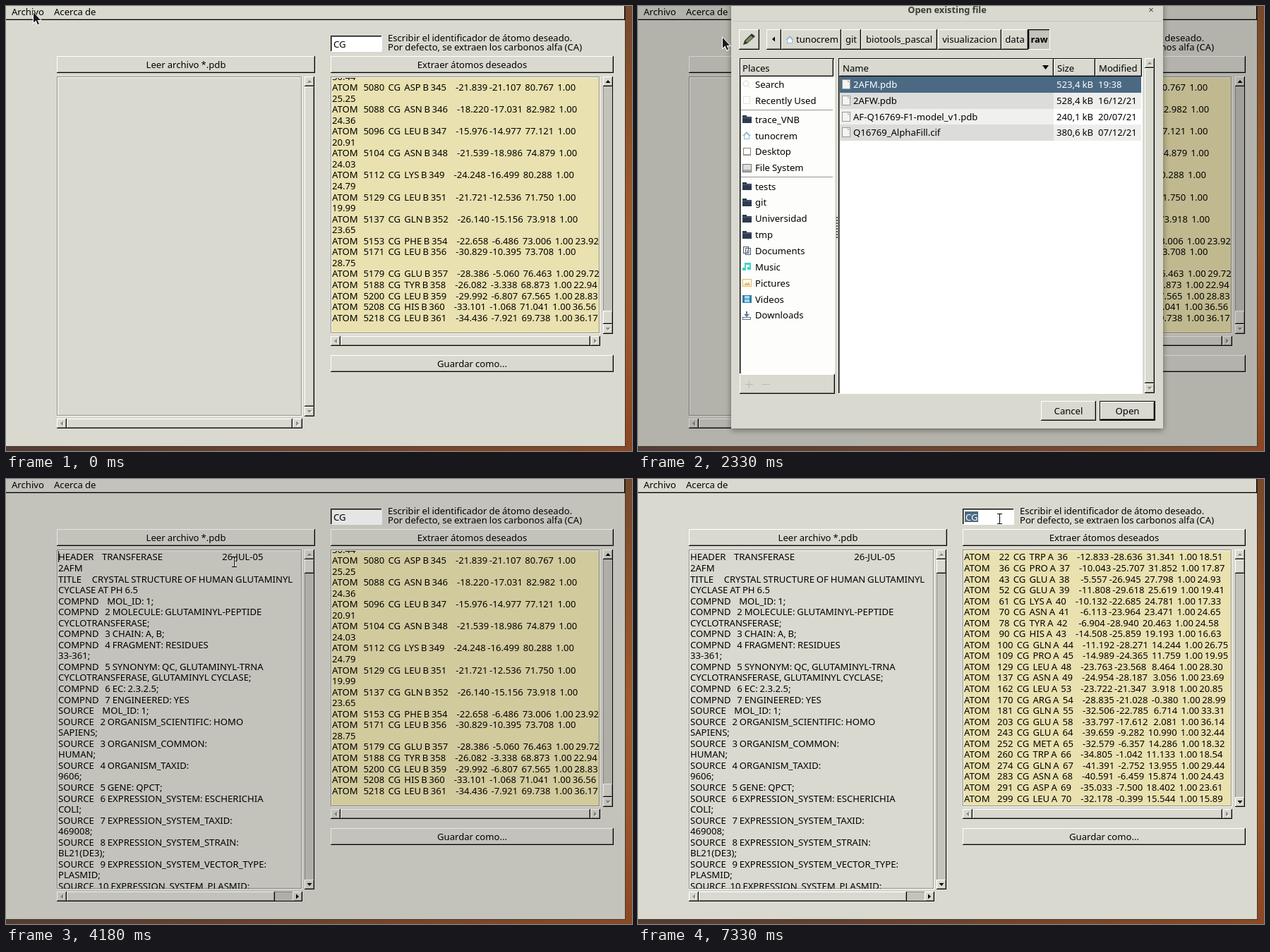
An HTML page with a canvas that plays this animation: 887x631 px, repeating every 8000 ms.

```html
<!DOCTYPE html>
<html lang="es">
<head>
<meta charset="utf-8">
<style>
html, body { margin: 0; width: 100%; height: 100%; overflow: hidden; }
canvas { display: block; }
</style>
</head>
<body>
<canvas id="stage" width="887" height="631"></canvas>
<script>
const LOOP = 8000, W = 887, H = 631, PAD = 40;
const BG = '#d9d9d0', TROUGH = '#c3c3ba', BLUE = '#4b6983', LIGHT = '#ebebe5';
const GRAY = '#8f8f87', FACE = '"Noto Sans", "Open Sans", sans-serif';

const screen = document.getElementById('stage').getContext('2d');
const layer = document.createElement('canvas');
layer.width = W;
layer.height = H + PAD;
const sheet = layer.getContext('2d');
let g = screen;

const header = `HEADER    TRANSFERASE                             26-JUL-05
2AFM
TITLE     CRYSTAL STRUCTURE OF HUMAN GLUTAMINYL
CYCLASE AT PH 6.5
COMPND    MOL_ID: 1;
COMPND   2 MOLECULE: GLUTAMINYL-PEPTIDE
CYCLOTRANSFERASE;
COMPND   3 CHAIN: A, B;
COMPND   4 FRAGMENT: RESIDUES
33-361;
COMPND   5 SYNONYM: QC, GLUTAMINYL-TRNA
CYCLOTRANSFERASE, GLUTAMINYL CYCLASE;
COMPND   6 EC: 2.3.2.5;
COMPND   7 ENGINEERED: YES
SOURCE    MOL_ID: 1;
SOURCE   2 ORGANISM_SCIENTIFIC: HOMO
SAPIENS;
SOURCE   3 ORGANISM_COMMON:
HUMAN;
SOURCE   4 ORGANISM_TAXID:
9606;
SOURCE   5 GENE: QPCT;
SOURCE   6 EXPRESSION_SYSTEM: ESCHERICHIA
COLI;
SOURCE   7 EXPRESSION_SYSTEM_TAXID:
469008;
SOURCE   8 EXPRESSION_SYSTEM_STRAIN:
BL21(DE3);
SOURCE   9 EXPRESSION_SYSTEM_VECTOR_TYPE:
PLASMID;
SOURCE  10 EXPRESSION_SYSTEM_PLASMID:`.split('\n');

// Formats atoms as PDB lines; long ones wrap before the last value.
const atoms = text => text.trim().split('\n').flatMap(line => {
  const [id, res, chain, seq, x, y, z, b] = line.split(' ');
  const start = 'ATOM  ' + id.padStart(5) + '  CG  ' + res + ' ' + chain + seq.padStart(4) +
    '    ' + x.padStart(8) + y.padStart(8) + z.padStart(8) + '  1.00';
  return id > 999 && y.length > 6 ? [start, b] : [start + b.padStart(6)];
});

const tail = ['30.44', ...atoms(`
5080 ASP B 345 -21.839 -21.107 80.767 25.25
5088 ASN B 346 -18.220 -17.031 82.982 24.36
5096 LEU B 347 -15.976 -14.977 77.121 20.91
5104 ASN B 348 -21.539 -18.986 74.879 24.03
5112 LYS B 349 -24.248 -16.499 80.288 24.79
5129 LEU B 351 -21.721 -12.536 71.750 19.99
5137 GLN B 352 -26.140 -15.156 73.918 23.65
5153 PHE B 354 -22.658 -6.486 73.006 23.92
5171 LEU B 356 -30.829 -10.395 73.708 28.75
5179 GLU B 357 -28.386 -5.060 76.463 29.72
5188 TYR B 358 -26.082 -3.338 68.873 22.94
5200 LEU B 359 -29.992 -6.807 67.565 28.83
5208 HIS B 360 -33.101 -1.068 71.041 36.56
5218 LEU B 361 -34.436 -7.921 69.738 36.17`)];

const head = atoms(`
22 TRP A 36 -12.833 -28.636 31.341 18.51
36 PRO A 37 -10.043 -25.707 31.852 17.87
43 GLU A 38 -5.557 -26.945 27.798 24.93
52 GLU A 39 -11.808 -29.618 25.619 19.41
61 LYS A 40 -10.132 -22.685 24.781 17.33
70 ASN A 41 -6.113 -23.964 23.471 24.65
78 TYR A 42 -6.904 -28.940 20.463 24.58
90 HIS A 43 -14.508 -25.859 19.193 16.63
100 GLN A 44 -11.192 -28.271 14.244 26.75
109 PRO A 45 -14.989 -24.365 11.759 19.95
129 LEU A 48 -23.763 -23.568 8.464 28.30
137 ASN A 49 -24.954 -28.187 3.056 23.69
162 LEU A 53 -23.722 -21.347 3.918 20.85
170 ARG A 54 -28.835 -21.028 -0.380 28.99
181 GLN A 55 -32.506 -22.785 6.714 33.31
203 GLU A 58 -33.797 -17.612 2.081 36.14
243 GLU A 64 -39.659 -9.282 10.990 32.44
252 MET A 65 -32.579 -6.357 14.286 18.32
260 TRP A 66 -34.805 -1.042 11.133 18.54
274 GLN A 67 -41.391 -2.752 13.955 29.44
283 ASN A 68 -40.591 -6.459 15.874 24.43
291 ASP A 69 -35.033 -7.500 18.402 23.61
299 LEU A 70 -32.178 -0.399 15.544 15.89`);

function rect(x, y, w, h, color) {
  g.fillStyle = color;
  g.fillRect(x, y, w, h);
}

function poly(color, ...p) {
  g.beginPath();
  for (let i = 0; i < p.length; i += 2) g.lineTo(p[i], p[i + 1]);
  g.closePath();
  g.fillStyle = color;
  g.fill();
}

// y is the middle of the capitals
function text(s, x, y, { color = '#000', align = 'left', bold = false, space = -0.3 } = {}) {
  g.font = (bold ? 'bold 12.8px ' : '13.1px ') + FACE;
  g.wordSpacing = space + 'px';
  g.textAlign = align;
  g.fillStyle = color;
  g.fillText(s, x, Math.round(y + 4.6));
}

function bevel(x, y, w, h, fill = BG, down = false) {
  rect(x, y, w, h, down ? '#fff' : '#000');
  rect(x, y, w - 1, h - 1, down ? '#000' : '#fff');
  rect(x + 1, y + 1, w - 2, h - 2, down ? fill : GRAY);
  if (down) {
    rect(x + 1, y + 1, w - 2, 1, GRAY);
    rect(x + 1, y + 1, 1, h - 2, GRAY);
  }
  rect(x + (down ? 2 : 1), y + (down ? 2 : 1), w - 3, h - 3, fill);
}

function button(label, x, y, w, h, fill, down) {
  bevel(x, y, w, h, fill, down);
  text(label, x + w / 2, y + h / 2, { align: 'center' });
}

function arrow(cx, cy, dx, dy, on) {
  const tri = (o, c) => poly(c, cx + dx * 2 + o, cy + dy * 2 + o,
    cx - dx * 2 - dy * 3.5 + o, cy - dy * 2 - dx * 3.5 + o,
    cx - dx * 2 + dy * 3.5 + o, cy - dy * 2 + dx * 3.5 + o);
  if (!on) tri(1, '#fff');
  tri(0, on ? '#000' : GRAY);
}

// a..b is the thumb's extent along the bar
function scrollbar(x, y, w, h, a, b, less, more) {
  const tall = h > w;
  rect(x, y, w, h, '#000');
  rect(x, y, w - 1, h - 1, GRAY);
  rect(x + 1, y + 1, w - 2, h - 2, TROUGH);
  if (tall) {
    bevel(x, y, w, 14);
    bevel(x, y + h - 14, w, 14);
    bevel(x, a, w, b - a);
    arrow(x + w / 2, y + 7, 0, -1, less);
    arrow(x + w / 2, y + h - 7, 0, 1, more);
  } else {
    bevel(x, y, 14, h);
    bevel(x + w - 14, y, 14, h);
    bevel(a, y, b - a, h);
    arrow(x + 7, y + h / 2, -1, 0, less);
    arrow(x + w - 7, y + h / 2, 1, 0, more);
  }
}

function memo(x, y, w, h, fill, lines, first, space) {
  rect(x, y, w, h, '#fff');
  rect(x, y, w - 1, h - 1, GRAY);
  rect(x + 1, y + 1, w - 3, h - 3, '#fff');
  rect(x + 2, y + 2, w - 4, h - 4, fill);
  g.save();
  g.beginPath();
  g.rect(x + 1, y + 2, w - 2, h - 3);
  g.clip();
  lines.forEach((s, i) => text(s, x + 2, first + i * 15.55, { space }));
  g.restore();
}

function wallpaper() {
  const side = g.createLinearGradient(0, 0, 0, H);
  ['#74492b', '#8d5129', '#a05a2b', '#9c552a', '#8a4723'].forEach((c, i) => side.addColorStop(i / 4, c));
  rect(0, 0, W, H, side);
  const base = g.createLinearGradient(0, 0, W, 0);
  base.addColorStop(0, '#523c33');
  base.addColorStop(1, '#8a4a25');
  rect(0, 624, 878, 7, base);
  rect(876, 0, 2, 625, '#4a3524');
  rect(0, 623, 878, 2, '#4a3a30');
}

function mainWindow(t, mouse) {
  const loaded = t >= 4000, fresh = t >= 5930;
  const menuOpen = t >= 680 && t < 1930;
  rect(0, 0, 877, 624, BG);
  rect(0, 18, 876, 1, GRAY);
  rect(0, 19, 877, 1, '#000');
  rect(876, 0, 1, 20, '#000');
  if (menuOpen) rect(1, 0, 60, 18, BLUE);
  text('Archivo', 8, 8, { color: menuOpen ? '#fff' : '#000' });
  text('Acerca de', 68, 8);

  button('Leer archivo *.pdb', 72, 71, 366, 24);
  const pressed = t >= 5830 && t < 5980;
  const hover = !menuOpen && t > 4250 && mouse.x > 460 && mouse.y > 71 && mouse.y < 95;
  button('Extraer átomos deseados', 460, 71, 401, 24, pressed ? TROUGH : hover ? LIGHT : BG, pressed);
  button('Guardar como...', 460, 495, 401, 24);

  bevel(460, 42, 73, 23, '#fff', true);
  const marked = t >= 7330;
  if (marked) rect(463, 46, 19, 15, BLUE);
  text('CG', 464, 54, { color: marked ? '#fff' : '#000' });
  text('Escribir el identificador de átomo deseado.', 541, 45);
  text('Por defecto, se extraen los carbonos alfa (CA)', 541, 58);

  memo(72, 100, 348, 482, BG, loaded ? header : [], 110.8, -0.5);
  scrollbar(423, 100, 14, 482, 114, loaded ? 134 : 568, false, loaded);
  scrollbar(72, 585, 348, 14, 86, loaded ? 381 : 406, false, loaded);
  const spans = [[680, 1050], [1450, 1930], [4000, 4450], [4850, 5650]];
  if (spans.some(([a, b]) => t >= a && t < b)) rect(74, 102, 1, 16, '#000');

  memo(460, 100, 382, 365, '#e9e1af', fresh ? head : tail, fresh ? 110.8 : 99.9, -0.8);
  scrollbar(846, 100, 14, 365, fresh ? 114 : 432, fresh ? 134 : 451, !fresh, fresh);
  scrollbar(460, 468, 382, 14, 474, 828, false, false);

  if (menuOpen) {
    rect(2, 19, 142, 62, '#000');
    rect(3, 20, 140, 60, '#fff');
    rect(4, 21, 139, 59, BG);
    const on = t >= 1200;
    if (on) bevel(4, 21, 138, 20, BLUE);
    text('Cargar archivo', 25, 31, { color: on ? '#fff' : '#000' });
    text('Extraer átomos', 25, 50);
    text('Salir', 25, 69.5);
  }
}

function outline(x, y, w, h, color) {
  g.strokeStyle = color;
  g.strokeRect(x + 0.5, y + 0.5, w - 1, h - 1);
}

function house(x, y) {
  poly('#8db9da', x, y + 6, x + 6, y, x + 12, y + 6, x + 10, y + 6, x + 10, y + 11, x + 2, y + 11, x + 2, y + 6);
  poly('#fff', x + 3, y + 6, x + 6, y + 3, x + 9, y + 6, x + 9, y + 10, x + 3, y + 10);
}

const icons = {
  find(x, y) {
    g.strokeStyle = '#dcdcdc';
    g.beginPath();
    g.arc(x + 5, y + 5, 4, 0, 7);
    g.moveTo(x + 8, y + 8);
    g.lineTo(x + 11, y + 11);
    g.stroke();
  },
  recent(x, y) { outline(x + 1, y, 10, 11, '#e2e2e2'); },
  folder(x, y) {
    rect(x, y, 6, 4, '#2e3a50');
    rect(x, y + 2, 13, 9, '#2e3a50');
    rect(x, y + 3, 13, 1, '#56627a');
  },
  house,
  desk(x, y) { outline(x + 1, y, 11, 11, '#85817b'); rect(x + 2, y + 9, 9, 1, '#c9b58f'); },
  disk(x, y) { outline(x, y, 13, 12, '#777'); rect(x + 1, y + 1, 11, 7, '#ddd'); rect(x + 1, y + 8, 11, 3, '#aaa'); },
  doc(x, y) { outline(x + 1, y, 8, 10, '#4d5a70'); outline(x + 4, y + 2, 8, 10, '#4d5a70'); rect(x + 6, y + 5, 4, 4, '#9aa4b4'); },
  music(x, y) {
    rect(x + 3, y, 9, 3, '#3fd6c4');
    rect(x + 3, y, 2, 9, '#3fd6c4');
    rect(x + 10, y, 2, 8, '#3fd6c4');
    rect(x, y + 7, 5, 4, '#3fd6c4');
    rect(x + 7, y + 6, 5, 4, '#3fd6c4');
  },
  image(x, y) { outline(x, y, 13, 11, '#e3b75a'); poly('#e3b75a', x + 2, y + 9, x + 5, y + 5, x + 7, y + 7, x + 9, y + 4, x + 11, y + 9); },
  video(x, y) { rect(x, y, 13, 11, '#2f7fae'); rect(x + 3, y + 1, 7, 4, '#a5dbee'); rect(x + 3, y + 6, 7, 4, '#a5dbee'); },
  down(x, y) {
    rect(x + 5, y, 2, 5, '#5d7591');
    poly('#5d7591', x + 2, y + 4, x + 10, y + 4, x + 6, y + 8);
    outline(x, y + 8, 12, 4, '#5d7591');
  }
};

const places = [
  ['find', 'Search', 111], ['recent', 'Recently Used', 134],
  ['folder', 'trace_VNB', 161], ['house', 'tunocrem', 184], ['desk', 'Desktop', 206.5], ['disk', 'File System', 229.5],
  ...[['folder', 'tests'], ['folder', 'git'], ['folder', 'Universidad'], ['folder', 'tmp'], ['doc', 'Documents'],
    ['music', 'Music'], ['image', 'Pictures'], ['video', 'Videos'], ['down', 'Downloads']
  ].map(([icon, name], i) => [icon, name, 256 + i * 22.85])
];

const files = [
  ['2AFM.pdb', '523,4 kB', '19:38'], ['2AFW.pdb', '528,4 kB', '16/12/21'],
  ['AF-Q16769-F1-model_v1.pdb', '240,1 kB', '20/07/21'], ['Q16769_AlphaFill.cif', '380,6 kB', '07/12/21']
];

function dialog(openDown) {
  g.shadowColor = 'rgba(0,0,0,.45)';
  g.shadowBlur = 8;
  g.shadowOffsetY = 2;
  g.fillStyle = BG;
  g.beginPath();
  g.roundRect(132, -12, 612, 611, [7, 7, 0, 0]);
  g.fill();
  g.shadowColor = 'transparent';
  rect(133, 21, 610, 1, '#c6c6bd');
  text('Open existing file', 438, 5, { align: 'center', bold: true, color: '#3c3c38' });
  text('×', 727, 5, { align: 'center', color: '#444' });

  bevel(143, 33, 29, 29);
  poly('#333', 149, 55, 151, 49, 161, 39, 166, 43, 155, 53);
  poly('#7c8c62', 152, 50, 160, 42, 163, 45, 155, 52);
  bevel(182, 33, 21, 29);
  arrow(192, 47, -1, 0, true);
  const tabs = [['', 203, 288], ['git', 288, 316], ['biotools_pascal', 316, 424], ['visualizacion', 425, 515], ['data', 515, 553]];
  tabs.forEach(([s, a, b]) => button(s, a, 33, b - a, 29));
  house(209, 42);
  text('tunocrem', 224, 47.5);
  bevel(553, 33, 31, 29, TROUGH, true);
  text('raw', 568.5, 47.5, { align: 'center', bold: true });

  bevel(144, 74, 135, 448, '#fdfdfc', true);
  bevel(145, 75, 132, 25);
  text('Places', 148, 88);
  places.forEach(([icon, name, y]) => {
    icons[icon](148, Math.round(y) - 6);
    text(name, 166, y);
  });
  [147, 242].forEach(y => rect(146, y, 130, 1, '#8f9a8c'));
  bevel(144, 522, 135, 28);
  [[152, 536, 11, 1], [157, 531, 1, 11], [175, 536, 12, 1]].forEach(r => rect(...r, '#b9b9b0'));
  for (let y = 299; y < 329; y += 4) rect(281, y, 2, 2, '#444');

  bevel(284, 74, 431, 476, '#fff', true);
  [['Name', 285, 589], ['Size', 589, 648], ['Modified', 648, 714]].forEach(([s, a, b]) => {
    bevel(a, 75, b - a, 25);
    text(s, a + 5, 88);
  });
  poly('#000', 573, 84, 582, 84, 577.5, 90);
  files.forEach(([name, size, date], i) => {
    const y = Math.round(100 + i * 22.8), color = i ? '#000' : '#fff';
    rect(286, y, 303, 23, i ? i % 2 ? '#dcdcda' : '#f0f0ee' : BLUE);
    rect(589, y, 124, 23, i ? i % 2 ? '#eeeeec' : '#fff' : BLUE);
    rect(289, y + 4, 12, 14, '#9a9a96');
    rect(290, y + 5, 10, 12, '#f4f4f2');
    poly('#b4b4b0', 297, y + 5, 300, y + 8, 297, y + 8);
    text(name, 305, y + 11.5, { color });
    text(size, 645, y + 11.5, { color, align: 'right' });
    text(date, 652, y + 11.5, { color });
  });
  scrollbar(718, 74, 14, 475, 88, 535, false, false);
  button('Cancel', 571, 560, 78, 28);
  rect(654, 560, 79, 28, '#000');
  button('Open', 655, 561, 77, 26, openDown ? TROUGH : BG, openDown);
}

// time, x, y
const path = [
  [0, 39, 9], [300, 39, 9], [400, 39, 8], [1200, 39, 8], [1600, 45, 27], [2130, 45, 27], [2680, 292, 88],
  [2749, 292, 88], [2750, 299, 107], [3030, 299, 107], [3180, 300, 120], [4000, 300, 120], [4150, 323, 117],
  [4600, 323, 117], [5230, 506, 85], [5630, 506, 85], [5680, 505, 84], [6650, 505, 84], [7130, 512, 56], [LOOP, 512, 56]
];

function mouseAt(t) {
  const i = path.findIndex(p => p[0] > t), a = path[i - 1], b = path[i];
  const k = (t - a[0]) / (b[0] - a[0]), e = k * k * (3 - 2 * k);
  return { x: a[1] + (b[1] - a[1]) * e, y: a[2] + (b[2] - a[2]) * e };
}

function pointer(t, { x, y }) {
  const inMemo = t > 4080 && x < 420 && y > 100;
  const inEntry = t > 6000 && y < 65;
  g.save();
  g.translate(Math.round(x), Math.round(y));
  if (inMemo || inEntry) {
    rect(-1, -7, 3, 15, 'rgba(255,255,255,.6)');
    rect(0, -6, 1, 13, '#000');
    rect(-3, -7, 7, 1, '#000');
    rect(-3, 7, 7, 1, '#000');
  } else {
    poly('#fff', -1, -2, -1, 16.5, 3, 13.5, 5.5, 19, 9, 17.5, 7, 12, 12, 12);
    poly('#1a1a1a', 0, 0, 0, 14.5, 3.5, 11.5, 6, 17.5, 8, 16.5, 5.5, 11, 10, 11);
  }
  g.restore();
}

const clamp = v => Math.max(0, Math.min(1, v));
const easeOut = k => 1 - (1 - k) ** 2;

function draw(t) {
  // The window effects advance in 30 ms steps, like a screen recording.
  const step = Math.floor(t / 30 + 0.1) * 30;
  const mouse = mouseAt(t);
  const shown = t < 4000 ? easeOut(clamp((step - 2033) / 100)) : 1 - easeOut(clamp((step - 4000) / 100));
  const dim = t < 4000 ? clamp((step - 2033) / 500) : 1 - clamp((step - 4000) / 250);
  g = screen;
  wallpaper();
  mainWindow(t, mouse);
  rect(0, 0, 877, 624, `rgba(0,0,0,${0.317 * dim})`);
  if (shown > 0) {
    g = sheet;
    g.setTransform(1, 0, 0, 1, 0, PAD);
    g.clearRect(0, -PAD, W, H + PAD);
    dialog(t >= 3700);
    g = screen;
    g.globalAlpha = shown;
    g.drawImage(layer, 0, 293 - (293 + PAD) * shown, W, (H + PAD) * shown);
    g.globalAlpha = 1;
  }
  pointer(t, mouse);
}

const begin = performance.now();
function tick() {
  draw((performance.now() - begin) % LOOP);
  requestAnimationFrame(tick);
}
tick();
</script>
</body>
</html>
```
